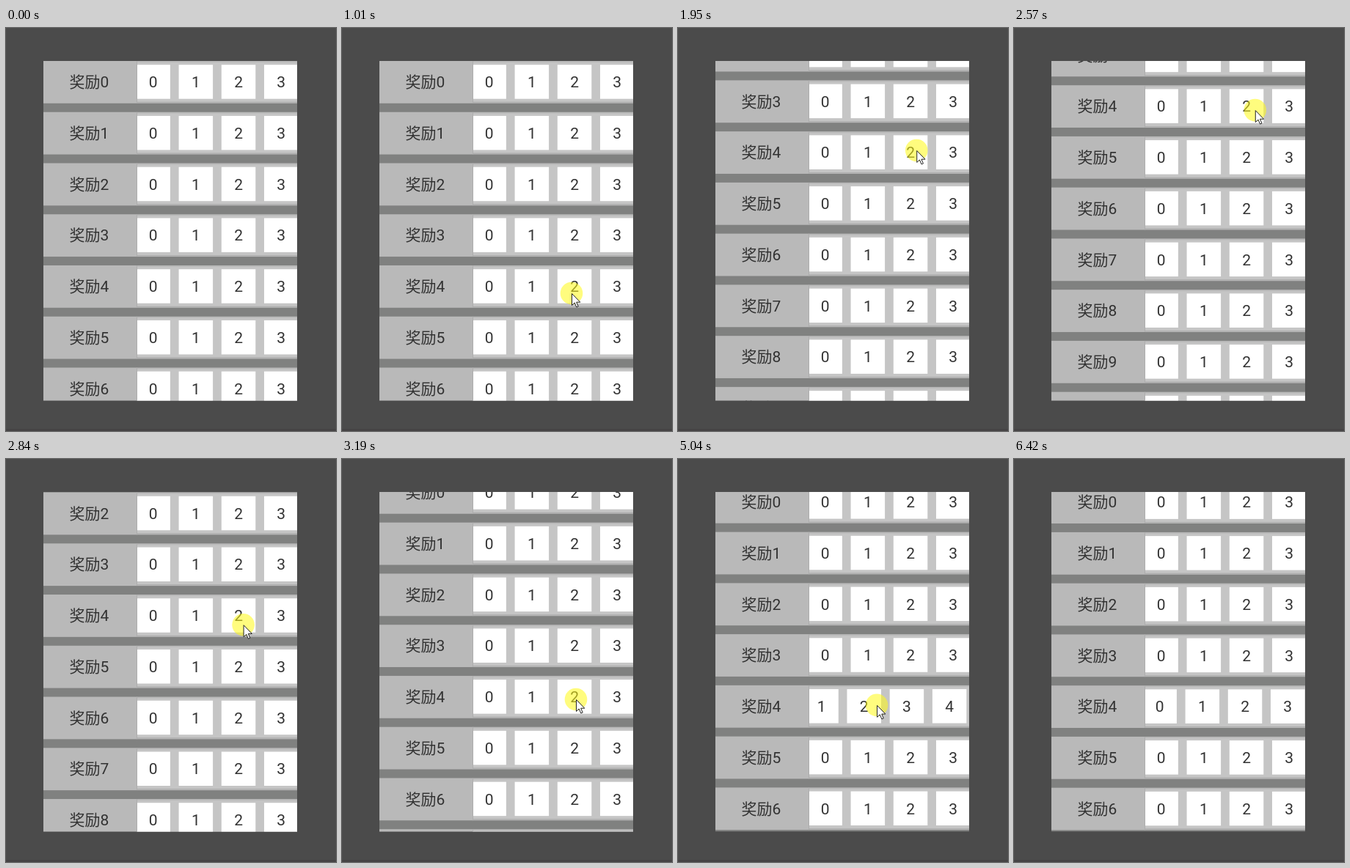
Recreate the animation shown at these times as an HTML page with a canvas. Size 450 px wide and 550 px high, loop 6550 ms.

```html
<!DOCTYPE html>
<html lang="zh">
<head>
<meta charset="utf-8">
<style>
  html, body { margin: 0; height: 100%; overflow: hidden; background: #4b4b4b; }
  canvas { display: block; }
</style>
</head>
<body>
<canvas id="stage" width="450" height="550"></canvas>
<script>
const ctx = document.getElementById('stage').getContext('2d');
const LOOP = 6550, STEP = 68.2, LAG = 16;
const VIEW = { x: 51, y: 45, w: 346, h: 463.5 };
const ROW = { pitch: 69.75, height: 57.8, split: 178.5, baseline: 36.2 };
const CELL = { x: 177.4, pitch: 58.2, size: 46.5, top: 5.2 };
const ENTER = 260, RELEASE = 3190, LEAVE = 5780, GONE = 6390;

const moves = [
  { from: 230, to: 700, x: 313, y: 362 },      // enter
  { from: 1280, to: 2324, x: 329, y: 107 },    // drag up
  { from: 2470, to: 3190, x: 319, y: 328 },    // drag down
  { from: 3260, to: 3800, x: 335, y: 336 },
  { from: 4000, to: 4564, x: 195, y: 337 },    // swipe left
  { from: 4600, to: 5392, x: 327.4, y: 335 },  // swipe back
  { from: LEAVE, to: GONE, x: 396, y: 545 }
];

function ease(u) {
  u = Math.min(1, Math.max(0, u));
  return u * u * u * (10 - 15 * u + 6 * u * u);
}

function pointerAt(t) {
  let x = 377, y = 511;
  for (const m of moves) {
    const k = ease((t - m.from) / (m.to - m.from));
    x += (m.x - x) * k;
    y += (m.y - y) * k;
  }
  return { x, y };
}

// The list follows the drag, then glides to rest
function scrollY(t) {
  if (t >= RELEASE) return 14.8 + 13.2 * Math.exp((RELEASE - t) / 500);
  return Math.max(0, 356 - pointerAt(t - LAG).y);
}

// One row follows the sideways swipe
function scrollX(t) {
  return t < 4000 ? 0 : Math.min(0, pointerAt(Math.min(t, LEAVE) - LAG).x - 329.4);
}

function box(color, x, y, w, h) {
  ctx.fillStyle = color;
  ctx.fillRect(x, y, w, h);
}

function clip(x, y, w, h) {
  ctx.save();
  ctx.beginPath();
  ctx.rect(x, y, w, h);
  ctx.clip();
}

function label(text, x, y) {
  ctx.fillStyle = '#323232';
  ctx.fillText(text, x, y);
}

function drawRow(index, top, shift) {
  const width = VIEW.x + VIEW.w - ROW.split;
  box('#b9b9b9', VIEW.x, top, VIEW.w, ROW.height);
  box('#c5c5c5', ROW.split, top + 2, width, ROW.height - 4);
  box('#adadad', ROW.split, top + ROW.height - 2, width, 1);
  box('#adadad', ROW.split - 0.5, top, 1, ROW.height);
  label('奖励' + index, 113.3, top + ROW.baseline);
  clip(ROW.split + 0.5, top, width, ROW.height);
  for (let i = 0; i < 8; i++) {
    const x = CELL.x + i * CELL.pitch + shift;
    box('#fff', x, top + CELL.top, CELL.size, CELL.size);
    label(i, x + CELL.size / 2, top + ROW.baseline);
  }
  ctx.restore();
}

const arrow = new Path2D('M.5 .5V16.5L4.2 13L6.8 19L9.2 18L6.7 12.2H11.8Z');

function drawPointer({ x, y }, pressed) {
  if (pressed) {
    ctx.fillStyle = 'rgba(255,250,20,.55)';
    ctx.beginPath();
    ctx.arc(x, y, 15.3, 0, Math.PI * 2);
    ctx.fill();
  }
  ctx.save();
  ctx.translate(x, y);
  ctx.fillStyle = '#fff';
  ctx.fill(arrow);
  ctx.strokeStyle = '#222';
  ctx.stroke(arrow);
  ctx.restore();
}

function draw(t) {
  box('#4b4b4b', 0, 0, 450, 550);
  box('#454344', 0, 547, 450, 3);
  ctx.font = '21px Roboto, "Noto Sans CJK SC", "Noto Sans CJK", sans-serif';
  ctx.textAlign = 'center';
  clip(VIEW.x, VIEW.y, VIEW.w, VIEW.h);
  box('#808180', VIEW.x, VIEW.y, VIEW.w, VIEW.h);
  const offset = scrollY(t);
  for (let i = 0; i < 12; i++) {
    drawRow(i, VIEW.y + i * ROW.pitch - offset, i === 4 ? scrollX(t) : 0);
  }
  ctx.restore();
  if (t >= ENTER - STEP / 2 && t < GONE) {
    const pressed = (t > 1000 && t < 3260) || (t > 3860 && t < LEAVE);
    drawPointer(pointerAt(t), pressed);
  }
}

// The picture updates about 15 times a second
function tick() {
  const t = performance.now() % LOOP;
  draw(Math.floor((t - 40) / STEP) * STEP + 49);
  requestAnimationFrame(tick);
}
tick();
</script>
</body>
</html>
```
